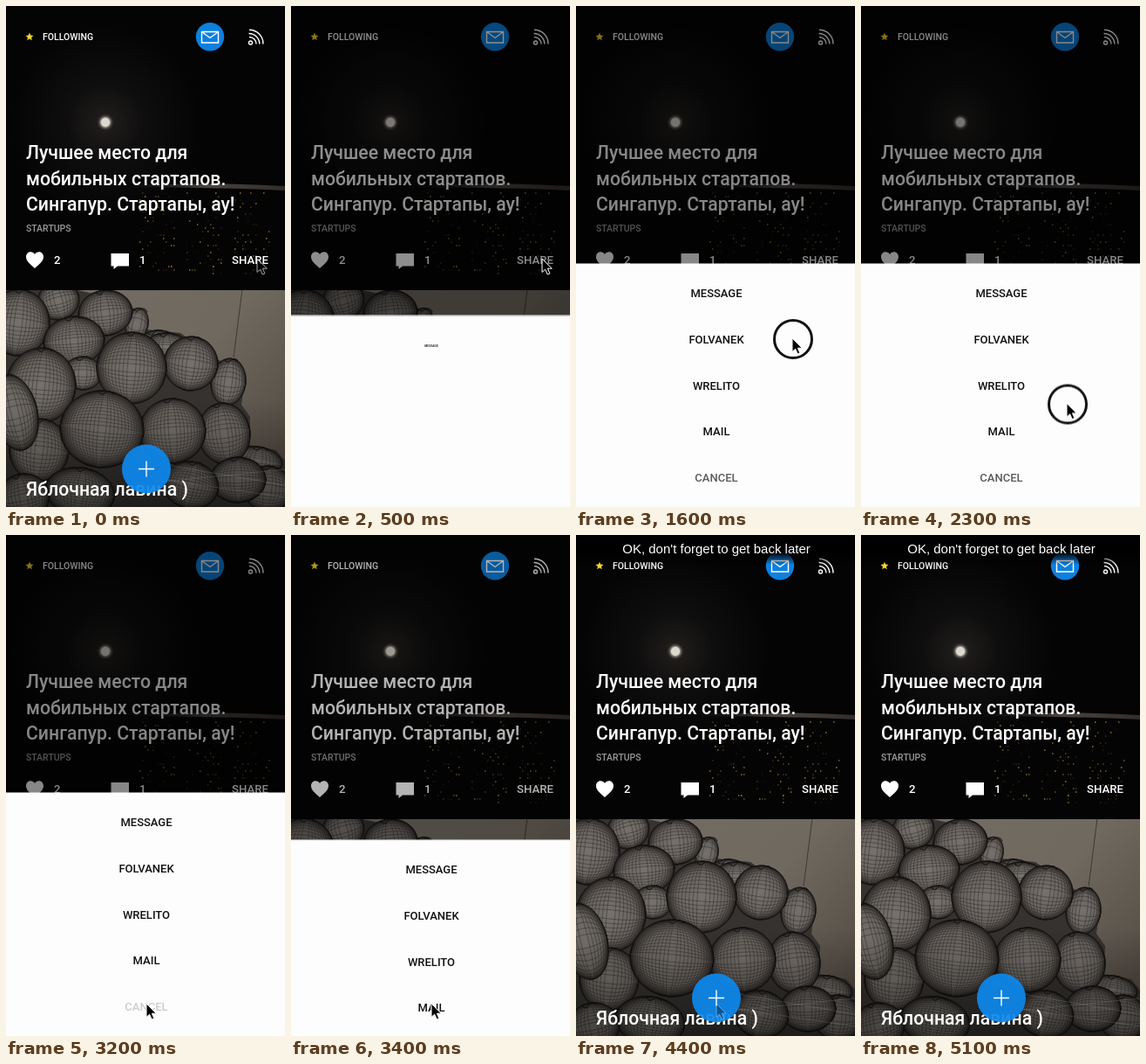
Write an HTML page that moves like this. It is 320x573 px and loops after 5.2 s.

```html
<!DOCTYPE html>
<html lang="ru">
<head>
<meta charset="utf-8">
<title>Share sheet</title>
<style>
  html, body { margin: 0; width: 100%; height: 100%; overflow: hidden; background: #000; }
  svg { display: block; width: 320px; height: 573px; }
  text { font-family: Roboto, "Noto Sans", sans-serif; font-weight: 500; fill: #fff; }
  .title { font-size: 21.2px; }
  .label { font-size: 13.2px; }
  .small { font-size: 10.5px; }
  .line { fill: none; stroke: #fff; stroke-width: 1.4; }
  .mesh { fill: none; stroke: #151413; stroke-width: .55; opacity: .6; }
  .item { font-size: 13px; text-anchor: middle; fill: #111; transform-box: fill-box; transform-origin: center; }
  .note { font: 15px "Liberation Sans", Arial, sans-serif; text-anchor: middle; }

  .shade, .sheet, .item, .cancel, .status, .cursor, .ring, .arrow { animation: 5.2s linear infinite both; }
  .shade { animation-name: shade; }
  .sheet { animation-name: sheet; }
  .item { animation-name: pop; animation-delay: calc(var(--i) * 100ms); }
  .cancel { animation-name: press; }
  .status { animation-name: status; }
  .cursor { animation-name: move; }
  .arrow { animation-name: arrow; }
  .ring { animation-name: ring; transform-origin: 1px 1px; }

  @keyframes shade {
    0%, 3.85% { opacity: 0; }
    10%, 62.5% { opacity: .47; }
    70.2%, 100% { opacity: 0; }
  }
  @keyframes sheet {
    0%, 3.85% { transform: translateY(279px); animation-timing-function: ease-out; }
    13.46%, 62.5% { transform: none; animation-timing-function: ease-in; }
    70.2%, 100% { transform: translateY(279px); }
  }
  @keyframes pop {
    0%, 8.65% { transform: scale(0); animation-timing-function: ease-out; }
    14.4%, 80% { transform: scale(1); }
    80.01%, 100% { transform: scale(0); }
  }
  @keyframes press {
    0%, 58% { opacity: 1; }
    60.6%, 72% { opacity: .3; }
    72.01%, 100% { opacity: 1; }
  }
  @keyframes status {
    0%, 67.3% { opacity: 0; }
    78.8%, 100% { opacity: 1; }
  }
  @keyframes move {
    0%, 17.3% { transform: translate(288px, 289px); animation-timing-function: ease-in-out; }
    28.8%, 31.7% { transform: translate(248px, 380px); animation-timing-function: ease-in-out; }
    44.2%, 46.1% { transform: translate(236px, 454.5px); animation-timing-function: ease-in-out; }
    54.8%, 100% { transform: translate(161px, 536px); }
  }
  @keyframes arrow {
    0% { opacity: .65; }
    3%, 80.7% { opacity: 1; }
    86.5%, 100% { opacity: 0; }
  }
  @keyframes ring {
    0%, 21% { opacity: 0; transform: scale(.6); }
    25%, 53.8% { opacity: 1; transform: none; }
    58.6%, 100% { opacity: 0; transform: scale(.85); }
  }
</style>
</head>
<body>
<svg viewBox="0 0 320 573">
  <defs>
    <linearGradient id="wall" x2="1" y2=".7">
      <stop offset="0" stop-color="#726d67"/>
      <stop offset=".6" stop-color="#70695f"/>
      <stop offset="1" stop-color="#554d45"/>
    </linearGradient>
    <linearGradient id="dusk" x2="0" y2="1">
      <stop offset=".5" stop-opacity="0"/>
      <stop offset="1" stop-opacity=".42"/>
    </linearGradient>
    <radialGradient id="net">
      <stop offset="0" stop-color="#76716d"/>
      <stop offset=".7" stop-color="#69645f"/>
      <stop offset="1" stop-color="#413d3a"/>
    </radialGradient>
    <radialGradient id="haze">
      <stop offset="0" stop-color="#221f1d"/>
      <stop offset=".4" stop-color="#0f0e0e"/>
      <stop offset="1" stop-color="#040404"/>
    </radialGradient>
    <radialGradient id="moon">
      <stop offset=".45" stop-color="#dcd8d0"/>
      <stop offset=".65" stop-color="#8d857c" stop-opacity=".6"/>
      <stop offset="1" stop-color="#2a2522" stop-opacity="0"/>
    </radialGradient>
    <linearGradient id="roof">
      <stop offset="0" stop-color="#3a3431" stop-opacity="0"/>
      <stop offset=".5" stop-color="#4a4440"/>
      <stop offset="1" stop-color="#332d2a"/>
    </linearGradient>
    <linearGradient id="bar" x2="0" y2="1">
      <stop offset=".6" stop-opacity=".95"/>
      <stop offset="1" stop-opacity="0"/>
    </linearGradient>
  </defs>

  <!-- lower card -->
  <rect y="324" width="320" height="249" fill="url(#wall)"/>
  <path d="M271 324L261 402" stroke="#3f3932" stroke-width="1"/>
  <path d="M0 324H78L140 338L162 370L200 374L240 402L274 425L270 456L280 470L279 502L310 508L320 520V573H0z" fill="#35322f"/>
  <g id="balls"/>
  <path d="M148 547L320 530M170 540L320 562M190 526L320 548" class="line" style="stroke-width:.6;opacity:.3"/>
  <rect y="324" width="320" height="249" fill="url(#dusk)"/>
  <text class="title" x="23" y="559.5">Яблочная лавина )</text>
  <circle cx="161" cy="529.5" r="28" fill="#0d88ec" fill-opacity=".93"/>
  <path class="line" d="M152 529.5h18M161 520.5v18"/>

  <!-- upper card -->
  <rect width="320" height="325" fill="#040404"/>
  <circle cx="114" cy="133" r="110" fill="url(#haze)"/>
  <circle cx="114" cy="133" r="10" fill="url(#moon)"/>
  <path d="M140 205Q230 201 320 206V211Q230 207 140 207z" fill="url(#roof)"/>
  <g id="towers"/>

  <path d="M27 30.6l1.3 3 3.2.3-2.4 2.1.7 3.2-2.8-1.7-2.8 1.7.7-3.2-2.4-2.1 3.2-.3z" fill="#f3d531"/>
  <text class="small" x="42" y="39">FOLLOWING</text>
  <circle cx="234" cy="35.3" r="16.2" fill="#0d80df"/>
  <path class="line" d="M224.5 29.5h19v12.500h-19zl9.5 7 9.5-7"/>
  <g class="line">
    <circle cx="280.5" cy="42" r="2"/>
    <path d="M279 35.5a8 8 0 0 1 8 8M278.5 31.5a12 12 0 0 1 12.3 12M279 27.3a16 16 0 0 1 16 16.2"/>
  </g>

  <text class="title" x="23" y="175">Лучшее место для</text>
  <text class="title" x="23" y="204.7">мобильных стартапов.</text>
  <text class="title" x="23" y="234">Сингапур. Стартапы, ау!</text>
  <text class="small" x="23" y="257.7" style="fill:#9a9a9a">STARTUPS</text>

  <path d="M33 300C26 294 23 291 23 286.8C23 280.5 30.5 279.5 33 284C35.5 279.5 43 280.5 43 286.8C43 291 40 294 33 300z" fill="#fff"/>
  <text class="label" x="55" y="295">2</text>
  <path d="M120.5 283h20.5v14.500h-13l-4.500 3.500v-3.500h-3z" fill="#fff"/>
  <text class="label" x="153" y="295">1</text>
  <text class="label" x="259" y="295">SHARE</text>

  <rect class="shade" width="320" height="573"/>

  <g class="sheet">
    <rect y="294.5" width="320" height="279" fill="#fdfdfd"/>
    <g id="menu"/>
  </g>

  <g class="status">
    <rect width="320" height="34" fill="url(#bar)"/>
    <text class="note" x="161" y="20.5">OK, don't forget to get back later</text>
  </g>

  <g class="cursor">
    <circle class="ring" cx="1" cy="1" r="21.5" fill="none" stroke="#111" stroke-width="3"/>
    <path class="arrow" d="M0 0V15.5L3.6 12.2L6.2 18L8.9 16.900L6.400 11.200H11.300Z" fill="#000" stroke="#fff"/>
  </g>
</svg>
<script>
  const add = (parent, tag, attrs, text = '') => {
    const el = document.createElementNS('http://www.w3.org/2000/svg', tag);
    for (const key in attrs) el.setAttribute(key, attrs[key]);
    el.textContent = text;
    return parent.appendChild(el);
  };
  const byId = id => document.getElementById(id);

  let seed = 7;
  const rand = () => (seed = seed * 16807 % 2147483647) / 2147483647;

  // Wire balls: centre x, y and radii, back to front
  const balls = [
    [60, 337, 24, 22], [150, 364, 13, 19], [114, 351, 31, 26], [172, 382, 20, 11],
    [14, 362, 36, 38], [184, 390, 26, 16], [78, 383, 35, 28], [255, 430, 20, 27],
    [212, 409, 31, 31], [88, 420, 22, 19], [40, 434, 40, 43], [144, 414, 40, 41],
    [289, 520, 28, 16], [250, 489, 30, 35], [191, 486, 38, 37], [38, 508, 34, 36],
    [110, 484, 48, 44], [10, 465, 26, 44], [300, 552, 28, 26], [266, 542, 32, 26],
    [212, 548, 32, 27], [85, 556, 40, 28], [20, 562, 30, 27]
  ];
  for (const [x, y, rx, ry] of balls) {
    const g = add(byId('balls'), 'g', {
      transform: `translate(${x} ${y}) rotate(${rand() * 30 - 15})`
    });
    add(g, 'ellipse', { rx, ry, fill: 'url(#net)', stroke: '#1c1a19' });
    const n = Math.round(rx / 3);
    for (let k = 1; k < n; k++) {
      const a = Math.sin(k / n * Math.PI / 2);
      add(g, 'ellipse', { rx: rx * a, ry, class: 'mesh' });
      add(g, 'ellipse', { rx, ry: ry * a, class: 'mesh' });
    }
    add(g, 'path', { d: `M-8 ${2 - ry}q4 5 8 0t9 1`, fill: 'none', stroke: '#151413' });
  }

  // Lit windows
  for (const x of [153, 207, 262]) {
    for (let i = 0; i < 75; i++) {
      add(byId('towers'), 'rect', {
        x: x + 3 * Math.floor(rand() * 14), y: 213 + 4 * Math.floor(rand() * 24),
        width: 1.5, height: 2, fill: '#b08a3c', opacity: (rand() ** 2 * .7).toFixed(2)
      });
    }
  }

  ['MESSAGE', 'FOLVANEK', 'WRELITO', 'MAIL', 'CANCEL'].forEach((name, i) => {
    const last = i === 4;
    const g = add(byId('menu'), 'g', last ? { class: 'cancel' } : {});
    add(g, 'text', {
      class: 'item', x: 161, y: 333.3 + i * 52.7,
      style: `--i:${i}` + (last ? ';fill:#5c5c5c' : '')
    }, name);
  });
</script>
</body>
</html>
```
